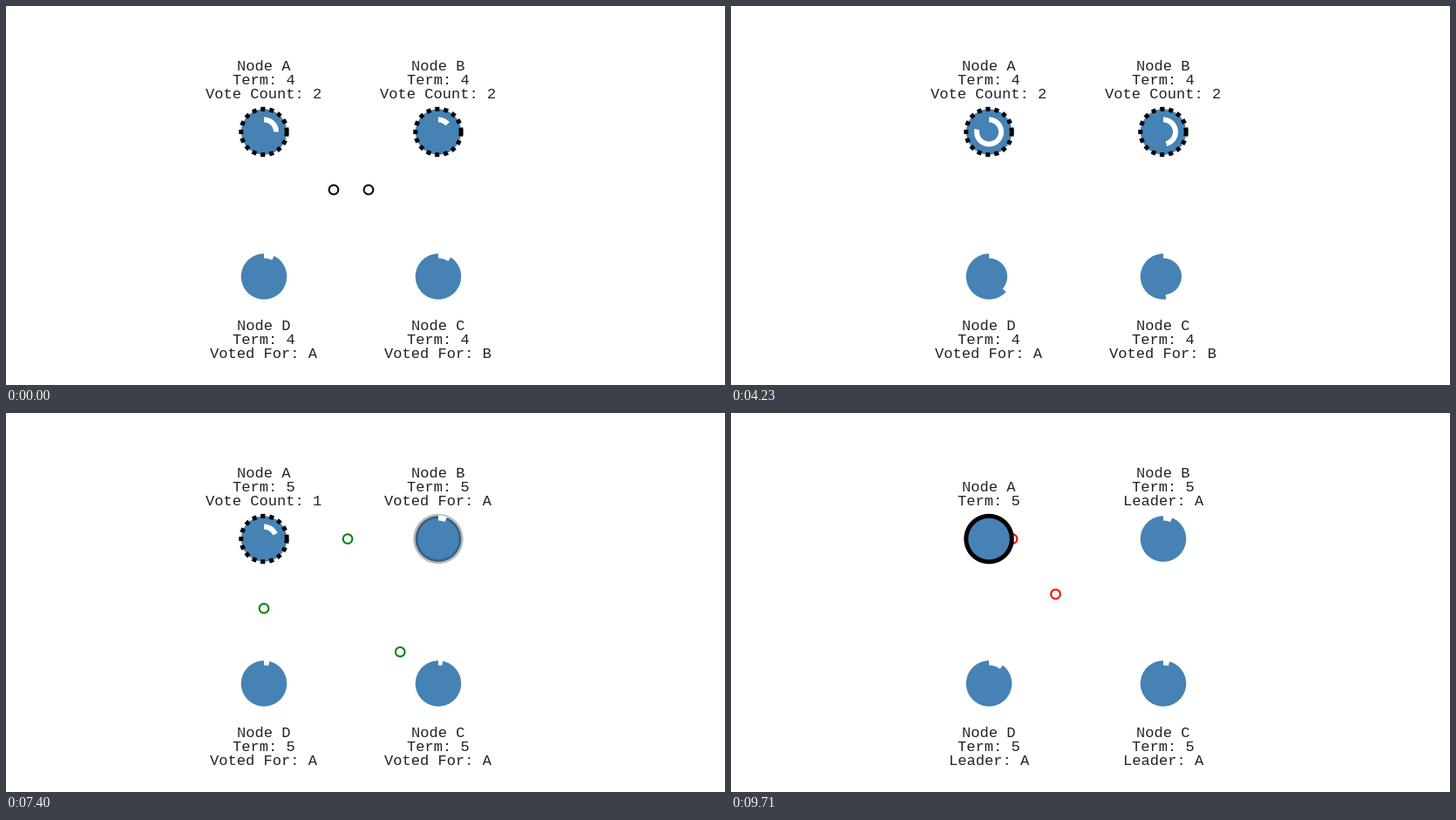
A matplotlib script for the animation above (9790 ms loop, 825 by 435 pixels).

```python
import numpy as np
import matplotlib.pyplot as plt
from matplotlib.animation import FuncAnimation
from matplotlib.patches import Circle, Wedge

plt.rcParams["text.hinting"] = "native"

W, H, DPI = 825, 435, 75
PX = 72 / DPI                      # one pixel in points
INTERVAL, FRAMES = 22, 445
STEPS_PER_MS = 0.013               # the picture advances 13 times a second
FIRST_STEP = 2

BLUE = "steelblue"
INK = "#222222"
R_NODE = 26.25
FADE = 9                           # steps a lost candidate ring takes to fade

POS = {"A": (296, 144.5), "B": (496, 144.5),
       "C": (496, 310.5), "D": (296, 310.5)}

# start step, role, term, last line, timer angle at start, degrees per step
PHASES = {
    "A": [(0, "candidate", 4, "Vote Count: 2", 82.6, 3.62),
          (76.6, "candidate", 5, "Vote Count: 1", 0, 3.45),
          (102.4, "leader", 5, "", 0, 0)],
    "B": [(0, "candidate", 4, "Vote Count: 2", 45, 2.2),
          (89.4, "follower", 5, "Voted For: A", 0, 3.3),
          (115.1, "follower", 5, "Leader: A", 0, 2.1)],
    "C": [(0, "follower", 4, "Voted For: B", 27.5, 2.64),
          (92.5, "follower", 5, "Voted For: A", 0, 3.27),
          (118.4, "follower", 5, "Leader: A", 0, 2.1)],
    "D": [(0, "follower", 4, "Voted For: A", 22, 2.0),
          (89.4, "follower", 5, "Voted For: A", 0, 2.1),
          (115.1, "follower", 5, "Leader: A", 0, 3.4)],
}

# sender, receiver, start step, steps under way, colour, is reply
MESSAGES = [
    ("C", "A", -7.6, 16, "black", True),
    ("D", "B", -7.6, 16, "black", True),
    ("A", "B", 76.6, 12.8, "green", False),
    ("A", "D", 76.6, 12.8, "green", False),
    ("A", "C", 76.6, 15.9, "green", False),
    ("B", "A", 89.4, 12.7, "green", True),
    ("D", "A", 89.4, 12.7, "green", True),
    ("C", "A", 92.5, 16, "green", True),
    ("A", "B", 102.4, 12.7, "red", False),
    ("A", "D", 102.4, 12.7, "red", False),
    ("A", "C", 102.4, 16, "red", False),
    ("B", "A", 115.1, 12.6, "red", True),
    ("D", "A", 115.1, 12.6, "red", True),
    ("C", "A", 118.4, 12.3, "red", True),
]

fig = plt.figure(figsize=(W / DPI, H / DPI), dpi=DPI, facecolor="white")
ax = fig.add_axes([0, 0, 1, 1])
ax.set_xlim(0, W)
ax.set_ylim(H, 0)
ax.axis("off")


class Node:
    def __init__(self, name):
        self.name = name
        self.phases = PHASES[name]
        x, y = POS[name]
        self.top = y < H / 2
        ax.add_patch(Circle((x, y), R_NODE, fc=BLUE, lw=0, zorder=3))
        a = np.linspace(0, 2 * np.pi, 181)
        self.ring, = ax.plot(x + R_NODE * np.cos(a), y + R_NODE * np.sin(a),
                             color="black", lw=5 * PX, zorder=4,
                             solid_capstyle="butt", dash_capstyle="butt")
        self.timer = ax.add_patch(Wedge((x, y), 17, -90, 0, width=6,
                                        fc="white", lw=0, zorder=5))
        base = 74 if self.top else 372
        self.rows = [ax.text(x, base + 16 * i, "", family="Liberation Mono",
                             size=17 * PX, color=INK,
                             ha="center", va="baseline")
                     for i in range(3)]

    def update(self, k):
        index = max(i for i, p in enumerate(self.phases) if p[0] <= k)
        start, role, term, note, angle, rate = self.phases[index]

        lines = [f"Node {self.name}", f"Term: {term}"]
        if note:
            lines.append(note)
        elif self.top:
            lines.insert(0, "")
        for row, line in zip(self.rows, lines):
            row.set_text(line)

        alpha = 1.0
        if role == "follower":
            was_candidate = index > 0 and self.phases[index - 1][1] == "candidate"
            alpha = max(0, 1 - (k - start) / FADE) if was_candidate else 0
        self.ring.set_alpha(alpha)
        self.ring.set_visible(alpha > 0)
        self.ring.set_linestyle((0, (1, 1)) if role == "candidate" else "-")

        self.timer.set_visible(role != "leader")
        self.timer.set_radius(17 if role == "candidate" else 27)
        self.timer.set_theta2(-90 + max(angle + rate * (k - start), 0.5))


class Message:
    def __init__(self, src, dst, start, length, color, reply):
        self.a, self.b = np.array(POS[src]), np.array(POS[dst])
        self.start, self.length = start, length
        if reply:
            style = dict(radius=5.3, fc="white", ec=color, lw=2 * PX)
        else:
            style = dict(radius=11.5, fc=color, lw=0)
        self.dot = ax.add_patch(Circle(self.a, zorder=2, **style))

    def update(self, k):
        p = (k - self.start) / self.length
        self.dot.set_visible(0 <= p < 1)
        self.dot.set_center(self.a + p * (self.b - self.a))


parts = [Node(n) for n in POS] + [Message(*m) for m in MESSAGES]


def update(frame):
    t = frame * INTERVAL + INTERVAL / 2
    k = max(int(t * STEPS_PER_MS), FIRST_STEP)
    for part in parts:
        part.update(k)
    return []


anim = FuncAnimation(fig, update, frames=FRAMES, interval=INTERVAL,
                     init_func=lambda: update(0), repeat=True, repeat_delay=0,
                     blit=False, cache_frame_data=False)
plt.show()
```
